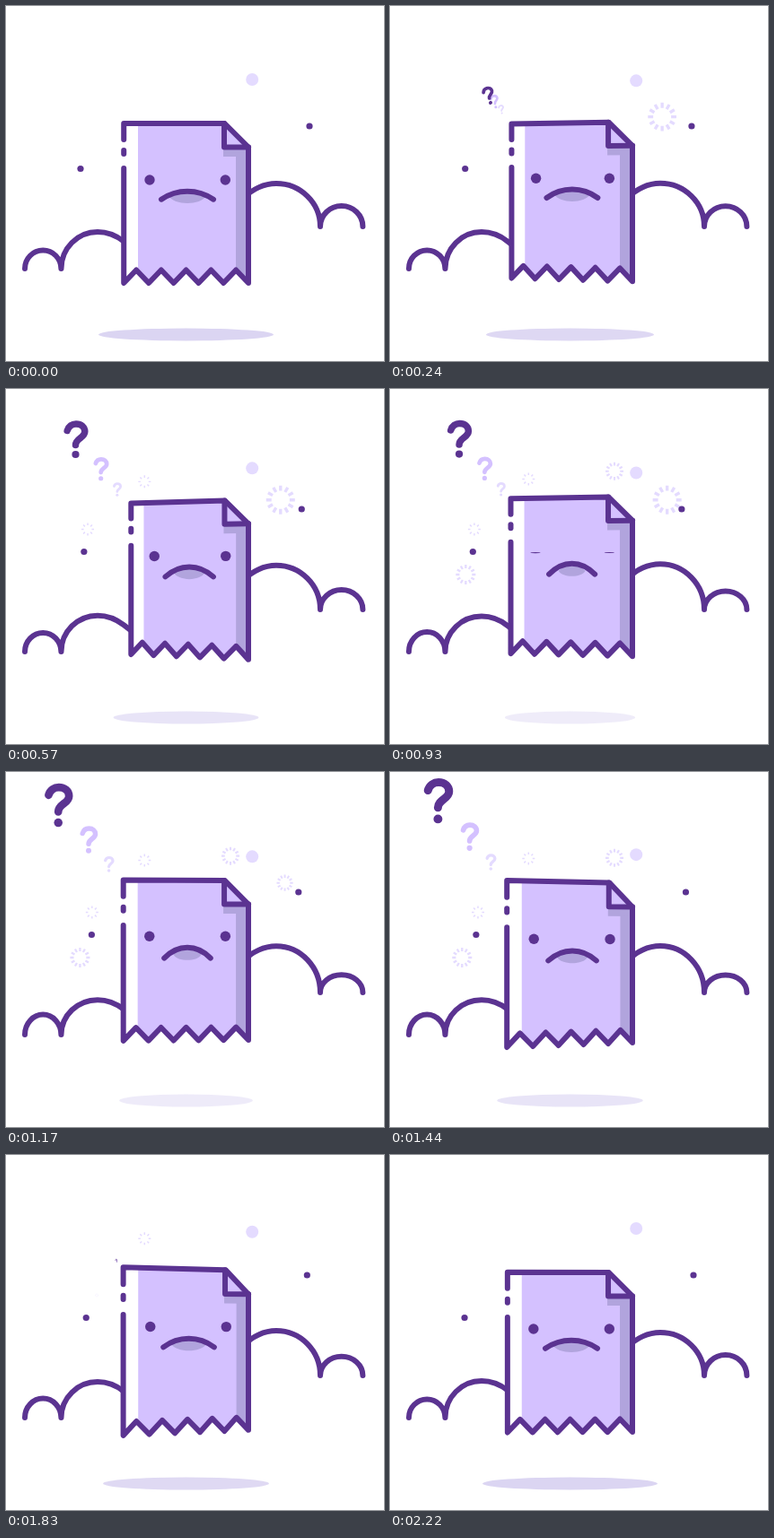
An HTML page with a canvas for the animation above (2.25 s loop, 421 by 396 pixels).

```html
<!DOCTYPE html>
<html lang="en">
<head>
<meta charset="utf-8">
<title>Sad page</title>
<style>
html, body { margin: 0; width: 100%; height: 100%; overflow: hidden; background: #fff; }
canvas { display: block; width: 421px; height: 396px; }
</style>
</head>
<body>
<canvas id="stage"></canvas>
<script>
const W = 421, H = 396, LOOP = 2250, PI = Math.PI;
const INK = '#5b3391', LILAC = '#d4c1ff', SHADE = '#b1a4dd', PALE = '#e4dbff';
const canvas = document.getElementById('stage');
const ctx = canvas.getContext('2d');
const dpr = window.devicePixelRatio || 1;
canvas.width = W * dpr;
canvas.height = H * dpr;

// Eased step from 0 to 1 between times a and b.
function ramp(t, a, b) {
  const p = Math.min(1, Math.max(0, (t - a) / (b - a)));
  return p * p * (3 - 2 * p);
}

// One rise and fall per loop; a positive skew peaks early, a negative one late.
function wave(t, skew) {
  const u = t / LOOP;
  return (1 - Math.cos(2 * PI * (u + skew * Math.sin(PI * u)))) / 2;
}

const lift = t => wave(t, .068);
const trail = t => wave(t, -.1);
const swing = t => 14 * PI / 180 * Math.sin(2 * PI * t / LOOP);
const blink = t => .1 + .9 * ramp(Math.abs(t - 930), 0, 90);

// Each mark pops out by (x, y), then slips further by d on both axes.
const marks = [
  { color: PALE, size: .37, x: 0, y: -7, d: 11.5 },
  { color: LILAC, size: .63, x: -18, y: -30, d: 17 },
  { color: INK, size: 1, x: -46, y: -63, d: 24 }
];

// Rings burst open at time t0, drift along (dx, dy) and close at t1.
const rings = [
  { n: 12, x: 302, y: 123.7, r: 16, dx: 1, dy: 0, t0: 100, t1: 1080 },
  { n: 8, x: 154.3, y: 105.3, r: 7, dx: 0, dy: -1, t0: 330, t1: 1840 },
  { n: 8, x: 89.5, y: 156.5, r: 7, dx: 1, dy: 0, t0: 380, t1: 1700 },
  { n: 12, x: 86.6, y: 207, r: 11, dx: -1, dy: 0, t0: 650, t1: 1440 },
  { n: 12, x: 250, y: 89.5, r: 10, dx: 0, dy: 1, t0: 650, t1: 1440 }
];

const LEFT = 131.2, RIGHT = 270;
const outline = [[LEFT, 131], [243.5, 131], [RIGHT, 157.5]];
for (let i = 0; i <= 10; i++) {
  outline.push([RIGHT - (RIGHT - LEFT) * i / 10, i % 2 ? 294.5 : 309]);
}

function pen(color, width) {
  ctx.strokeStyle = color;
  ctx.lineWidth = width;
  ctx.lineCap = ctx.lineJoin = 'round';
}

function oval(x, y, rx, ry, color) {
  ctx.fillStyle = color;
  ctx.beginPath();
  ctx.ellipse(x, y, rx, ry, 0, 0, 2 * PI);
  ctx.fill();
}

function ring({ n, x, y, r, dx, dy, t0, t1 }, t) {
  const size = r * ramp(t, t0, t0 + 150) * (1 - ramp(t, t1, t1 + 200));
  if (size < .1) return;
  const drift = .008 * (t - t0);
  ctx.save();
  ctx.translate(x + dx * drift, y + dy * drift);
  pen(PALE, size * .21);
  ctx.lineCap = 'butt';
  ctx.beginPath();
  for (let i = 0; i < n; i++) {
    ctx.moveTo(size * .63, 0);
    ctx.lineTo(size, 0);
    ctx.rotate(2 * PI / n);
  }
  ctx.stroke();
  ctx.restore();
}

const hook = new Path2D('M-9.8-9.5C-8.3-14.5-4.3-17 0-17C5.7-17 9.8-13.5 9.8-8.5C9.8-1.5-.5-1-.5 6.5');
function question({ color, size, x, y, d }, i, t) {
  const start = 70 + 25 * i;
  const out = ramp(t, start, start + 330) * (1 - ramp(t, 1440, 1860));
  if (out <= 0) return;
  const slip = ramp(t, 900, 1280);
  const scale = size * (1 + .2 * slip) * out ** .6;
  ctx.save();
  ctx.translate(124 + out * (x - d * slip), 119 + out * (y - d * slip));
  ctx.rotate(-(1 - out) * PI / 8);
  ctx.scale(scale, scale);
  pen(color, 7.5);
  ctx.stroke(hook);
  oval(-.5, 17, 4.1, 4.1, color);
  ctx.restore();
}

function clouds(g) {
  pen(INK, 6);
  ctx.beginPath();
  ctx.ellipse(41.2, 293, 20.2, 20.5 + 2 * g, 0, PI, 2 * PI);
  const top = 252 + 2.3 * g;
  ctx.ellipse(102, 293, 40.5, 293 - top, 0, PI, 1.5 * PI);
  ctx.bezierCurveTo(114, top, 124, top + 5, 131, top + 10.5);
  ctx.lineTo(144, top + 20.5);
  ctx.stroke();

  const peak = 198 - 4 * g;
  ctx.beginPath();
  ctx.moveTo(264, peak + 17);
  ctx.bezierCurveTo(274, peak + 6, 288, peak, 301, peak);
  ctx.ellipse(301, 246, 49, 246 - peak, 0, 1.5 * PI, 2 * PI);
  ctx.ellipse(373.7, 246, 23.7, 23 - 3.5 * g, 0, PI, 2 * PI);
  ctx.stroke();
}

function page(t, f) {
  // The sheet turns about its right edge, seen in perspective.
  const a = swing(t), rise = 10.8 * f;
  const at = ([x, y]) => {
    const d = RIGHT - x, k = 600 / (600 + d * Math.sin(a));
    return [210 + (60 - d * Math.cos(a)) * k, 198 + (y - 198) * k - rise];
  };
  const trace = pts => pts.forEach((p, i) => ctx[i ? 'lineTo' : 'moveTo'](...at(p)));
  const fill = (pts, color) => {
    ctx.fillStyle = color;
    ctx.beginPath();
    trace(pts);
    ctx.fill();
  };
  const box = (l, u, r, b, color) => fill([[l, u], [r, u], [r, b], [l, b]], color);
  const line = pts => {
    ctx.beginPath();
    trace(pts);
    ctx.stroke();
  };

  ctx.save();
  ctx.beginPath();
  trace(outline);
  ctx.clip();
  box(125, 125, 275, 315, '#fff');
  box(147, 125, 275, 315, LILAC);
  box(256, 158, 275, 315, SHADE);
  box(242, 158, 275, 168, SHADE);
  ctx.restore();

  const fold = [[243, 131], [243, 157.5], [RIGHT, 157.5]];
  fill(fold, LILAC);
  pen(INK, 6);
  line([[LEFT, 149], ...outline.slice(0, 3)]);
  line(fold);
  line([[LEFT, 161], [LEFT, 165]]);
  line([...outline.slice(2), [LEFT, 181]]);

  for (const x of [160, 244.3]) {
    oval(...at([x, 194 - .8 * f]), 5.7, 5.7 * blink(t), INK);
  }

  const [mx, my] = at([202, 215.7 + 2 * f]);
  const half = 29 - 3.5 * f, arch = 9 + 3 * f, lip = 21 - 6 * f;
  ctx.fillStyle = SHADE;
  ctx.beginPath();
  ctx.moveTo(mx - lip, my - 4);
  ctx.quadraticCurveTo(mx, my - arch - 5, mx + lip, my - 4);
  ctx.bezierCurveTo(mx + lip * .7, my + 7 - 3 * f, mx - lip * .7, my + 7 - 3 * f, mx - lip, my - 4);
  ctx.fill();
  pen(INK, 6);
  ctx.beginPath();
  ctx.moveTo(mx - half, my);
  ctx.bezierCurveTo(mx - half * .4, my - arch * 4 / 3, mx + half * .4, my - arch * 4 / 3, mx + half, my);
  ctx.stroke();
}

function draw(t) {
  const f = lift(t), g = trail(t);
  ctx.setTransform(dpr, 0, 0, dpr, 0, 0);
  ctx.fillStyle = '#fff';
  ctx.fillRect(0, 0, W, H);

  ctx.globalAlpha = 1 - .56 * f;
  oval(200.5, 366.5, 97.5 - 25 * f, 7, '#dbd5f2');
  ctx.globalAlpha = 1;

  oval(274.2, 82 + 12.4 * wave(t, 0), 7, 7, PALE);
  rings.forEach(r => ring(r, t));
  oval(338 - 13.2 * f, 134, 3.6, 3.6, INK);
  oval(83 + 13.2 * g, 181.5, 3.6, 3.6, INK);
  marks.forEach((m, i) => question(m, i, t));
  clouds(g);
  page(t, f);
}

const start = performance.now();
function tick() {
  draw((performance.now() - start) % LOOP);
  requestAnimationFrame(tick);
}
tick();
</script>
</body>
</html>
```
